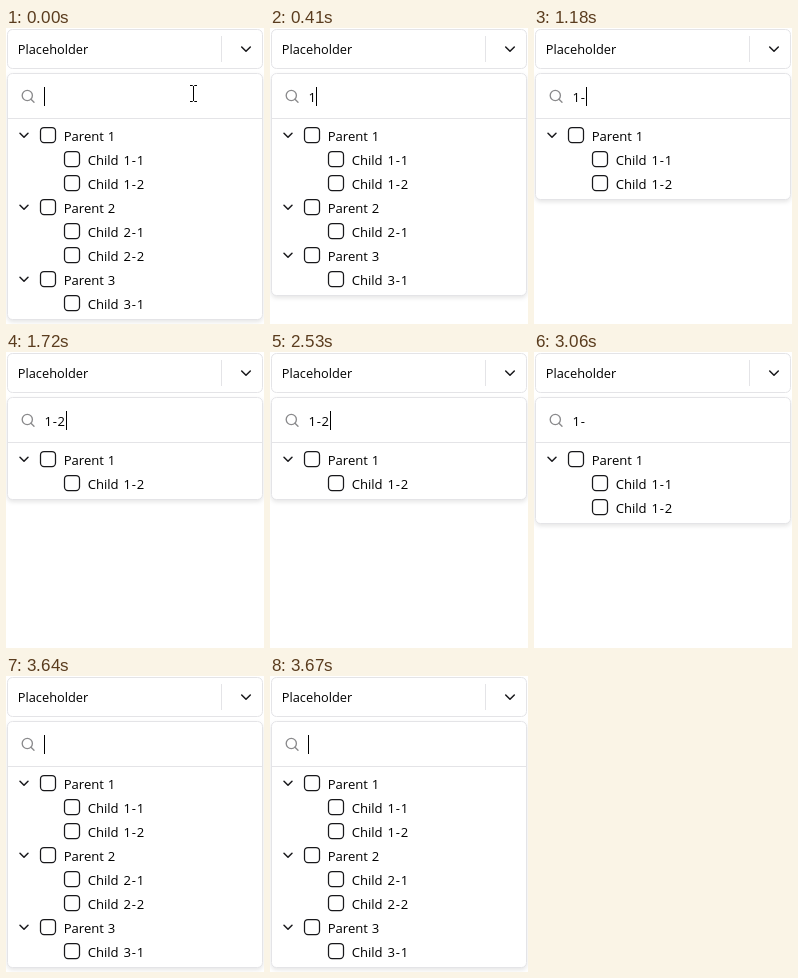
An HTML page that plays this animation: 258x296 px, repeating every 3.87 s.

```html
<!DOCTYPE html>
<html lang="en">
<head>
<meta charset="utf-8">
<title>Tree select search</title>
<style>
  html, body { margin: 0; width: 100%; height: 100%; overflow: hidden; background: #fff; }
  svg { display: block; width: 258px; height: 296px; }
  text { font: 13.1px "Open Sans", "Noto Sans", sans-serif; fill: #000; white-space: pre; }
  .value { font-size: 12.8px; }
  .num { letter-spacing: .7px; }
  .box { fill: #fff; stroke: #e4e4e7; }
  #panel { filter: drop-shadow(0 2px 2px rgba(0, 0, 0, .1)); }
  .line { stroke: #e4e4e7; }
  .check { fill: #fff; stroke: #18181b; stroke-width: 1.25; }
  .icon { fill: none; stroke: #18181b; stroke-width: 1.5; stroke-linecap: round; stroke-linejoin: round; }
  .search { stroke: #8a8a8c; stroke-width: 1.35; }
  .beam { fill: none; stroke: #000; }
</style>
</head>
<body>
<svg viewBox="0 0 258 296">
  <rect class="box" x="1.5" y="1.5" width="255" height="39" rx="5"/>
  <text class="value" x="11.8" y="26">Placeholder</text>
  <path class="line" d="M215.5 8V34"/>
  <path class="icon" d="M235.7 19l4.3 4.3 4.3-4.3"/>

  <rect class="box" id="panel" x="1.5" y="45.5" width="255" rx="5"/>
  <path class="line" d="M2 90.5H256"/>
  <g class="icon search"><circle cx="21.3" cy="67.5" r="5.1"/><path d="M28 74.2l-3-3"/></g>
  <text class="num" id="query" x="38.5" y="74"></text>
  <rect id="caret" y="59" width="1" height="19"/>
  <g id="rows"></g>
  <path class="beam" id="beam" d="M184 57.5h2.5l1 1 1-1h2.5M187.5 58V73M184 73.5h2.5l1-1 1 1h2.5"/>
</svg>
<script>
const LOOP = 3870;
const tree = { 1: ["1-1", "1-2"], 2: ["2-1", "2-2"], 3: ["3-1"] };
const caretX = [38, 46, 52, 60];

// [start ms, typed text, caret on, filter applied to the list]
const steps = [
  [0, "", 1, ""],
  [370, "1", 1, ""],
  [410, "1", 1, "1"],
  [910, "1", 0, "1"],
  [1180, "1-", 1, "1-"],
  [1450, "1-", 0, "1-"],
  [1720, "1-2", 1, "1-2"],
  [1990, "1-2", 0, "1-2"],
  [2530, "1-2", 1, "1-2"],
  [2660, "1-", 1, "1-"],
  [3060, "1-", 0, "1-"],
  [3260, "1", 1, "1"],
  [3600, "", 1, "1"],
  [3640, "", 1, ""]
];

const $ = id => document.getElementById(id);

function row(i, x, label, num, numX, open) {
  const y = 24 * i;
  return `${open ? `<path class="icon" d="M14 ${y + 105.2}l4 4 4-4"/>` : ""}
    <rect class="check" x="${x + .5}" y="${y + 99.5}" width="15" height="15" rx="3.5"/>
    <text x="${x + 23.7}" y="${y + 113}">${label}</text>
    <text class="num" x="${numX}" y="${y + 113}">${num}</text>`;
}

function list(filter) {
  let n = 0, html = "";
  for (const [id, kids] of Object.entries(tree)) {
    const found = kids.filter(k => k.includes(filter));
    if (!found.length) continue;
    html += row(n++, 34, "Parent", id, 101.8, true);
    for (const k of found) html += row(n++, 58, "Child", k, 117.6, false);
  }
  $("rows").innerHTML = html;
  $("panel").setAttribute("height", 54 + 24 * n);
}

let shown;
function draw(now) {
  const t = now % LOOP;
  const step = steps.findLast(s => s[0] <= t);
  if (step !== shown) {
    const [start, text, caret, filter] = shown = step;
    $("query").textContent = text;
    $("caret").setAttribute("x", caretX[text.length]);
    $("caret").style.opacity = caret;
    $("beam").style.opacity = start === 0 ? 1 : 0;
    list(filter);
  }
  requestAnimationFrame(draw);
}
draw(0);
</script>
</body>
</html>
```
